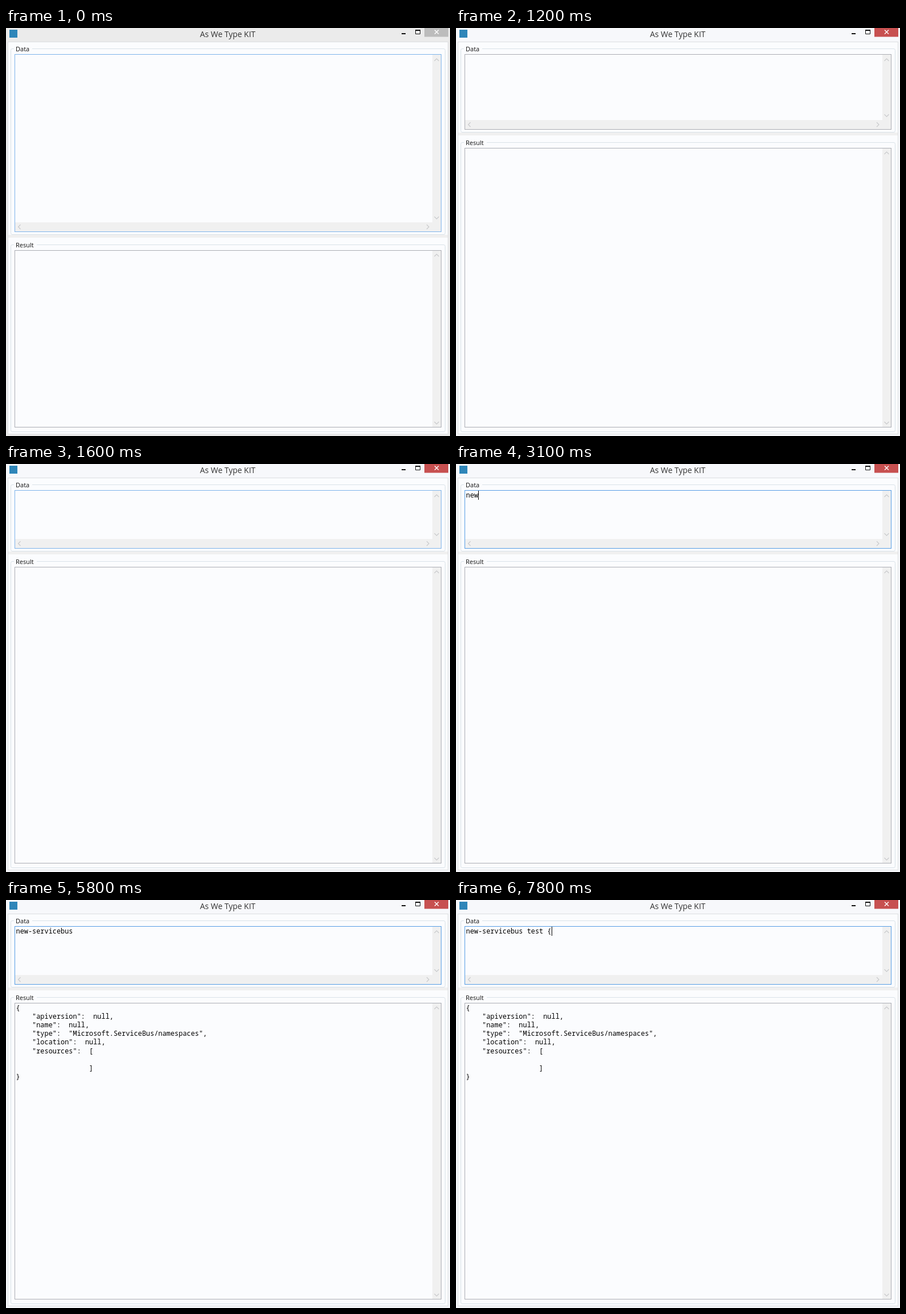
Animation of 780x718 px, one loop 8 s. Source, as an HTML page:

```html
<!DOCTYPE html>
<html lang="en">
<head>
<meta charset="utf-8">
<title>As We Type KIT</title>
<style>
  html, body { margin: 0; width: 100%; height: 100%; overflow: hidden; }
  svg { display: block; }
  path { fill: none; }
  .label { font: 11px "Open Sans", sans-serif; fill: #111; }
  .code { font: 11.91px "Noto Sans Mono", monospace; fill: #000; white-space: pre; }
  .group { stroke: #d9e2e8; }
  .box { fill: #fbfcfe; stroke: #abadb3; }
  .track { fill: #f0f0f0; }
  .chevron { stroke: #c8c9cb; stroke-width: 1.1; }
  #frame { fill: #ebebeb; }
  #close { fill: #bcbcbc; }
  .active #frame { fill: #f7f8fb; }
  .active #close { fill: #c75050; }
  .hover #dataBox { stroke: #7eb4ea; }
  .focus #dataBox { stroke: #569de5; }
</style>
</head>
<body>
<svg id="stage" width="780" height="718" viewBox="0 0 780 718">
  <rect id="frame" width="780" height="718"/>
  <rect x="3.5" y="24.5" width="773" height="690" fill="#fbfcfe" stroke="#dcdee0"/>

  <rect x="6" y="3" width="14" height="14" fill="#2f86b9"/>
  <text x="389.5" y="16" text-anchor="middle" font-family="Open Sans, sans-serif" font-size="13.9" fill="#333">As We Type KIT</text>
  <rect x="695" y="9" width="7" height="2" fill="#111"/>
  <path d="M719.5 4V10.5H727.5V4" stroke="#111"/>
  <rect x="719" y="3" width="9" height="2" fill="#111"/>
  <rect id="close" x="735" width="42" height="15.5"/>
  <path d="M753 3.5l7 7m0-7l-7 7" stroke="#fff" stroke-width="1.4"/>

  <path id="dataGroup" class="group"/>
  <text class="label" x="17" y="41">Data</text>
  <rect id="dataBox" class="box" x="15.5" y="46.5" width="749"/>
  <rect id="dataTrack" class="track" x="749" y="47" width="15"/>
  <path class="chevron" d="M752.5 58l4-4 4 4"/>
  <g id="dataFoot">
    <rect class="track" x="16" y="-16" width="748" height="16"/>
    <path class="chevron" d="M752.5-26l4 4 4-4M25.5-12l-4 4 4 4M739-12l4 4-4 4"/>
    <rect x="4" y="6" width="772" height="5" fill="#f0f0f0"/>
  </g>
  <text id="typed" class="code" x="17.5" y="59"></text>
  <rect id="caret" y="47" width="1" height="16"/>

  <path id="resultGroup" class="group"/>
  <text id="resultLabel" class="label" x="17">Result</text>
  <rect id="resultBox" class="box" x="15.5" width="749"/>
  <rect id="resultTrack" class="track" x="749" width="15"/>
  <path id="resultUp" class="chevron" d="M752.5 11l4-4 4 4"/>
  <path class="chevron" d="M752.5 693l4 4 4-4"/>
  <g id="output"></g>
</svg>
<script>
  const LOOP = 8000, ADVANCE = 7.146, LINE = 15.2;
  const command = 'new-servicebus test {';
  const keyTimes = [2800, 3000, 3100, 3500, 3700, 3800, 4000, 4300, 4500, 4600, 4800,
    5000, 5200, 5300, 6200, 6900, 7000, 7100, 7200, 7400, 7800];
  const caretGaps = [[0, 1800], [2300, 2800], [5800, 6200], [6800, 6900]];
  // [time, bottom edge of the data box] while the splitter is dragged
  const drag = [[0, 358], [1100, 270], [1200, 178], [1300, 161], [1400, 152], [1500, 148]];
  const json = `{
    "apiversion":  null,
    "name":  null,
    "type":  "Microsoft.ServiceBus/namespaces",
    "location":  null,
    "resources":  [

                  ]
}`;

  const $ = id => document.getElementById(id);
  const set = (id, attrs) => {
    for (const name in attrs) $(id).setAttribute(name, attrs[name]);
  };
  const within = (t, from, to) => t >= from && t < to;

  const groupPath = (top, bottom, gapEnd) =>
    `M14 ${top}H11Q8.5 ${top} 8.5 ${top + 3}V${bottom - 3}Q8.5 ${bottom} 11 ${bottom}` +
    `H769Q771.5 ${bottom} 771.5 ${bottom - 3}V${top + 3}Q771.5 ${top} 769 ${top}H${gapEnd}`;

  json.split('\n').forEach((line, i) => {
    const text = document.createElementNS('http://www.w3.org/2000/svg', 'text');
    text.setAttribute('class', 'code');
    text.setAttribute('x', 17.5);
    text.setAttribute('y', Math.round(193.6 + i * LINE));
    text.textContent = line;
    $('output').append(text);
  });

  function layout(bottom) {
    const top = bottom + 33;
    set('dataGroup', { d: groupPath(36.5, bottom + 5.5, 46) });
    set('dataBox', { height: bottom - 46 });
    set('dataTrack', { height: bottom - 47 });
    set('dataFoot', { transform: `translate(0 ${bottom})` });
    set('resultGroup', { d: groupPath(bottom + 23.5, 710.5, 54) });
    set('resultLabel', { y: top - 5 });
    set('resultBox', { y: top + .5, height: 702 - top });
    set('resultTrack', { y: top + 1, height: 701 - top });
    set('resultUp', { transform: `translate(0 ${top})` });
  }

  function render(t) {
    layout(drag.filter(([time]) => time <= t).pop()[1]);
    const { classList } = $('stage');
    classList.toggle('active', t >= 1000);
    classList.toggle('hover', t < 500 || within(t, 1600, 1800));
    classList.toggle('focus', t >= 1800);

    const count = keyTimes.filter(time => time <= t).length;
    const caretOn = !caretGaps.some(([from, to]) => within(t, from, to));
    $('typed').textContent = command.slice(0, count);
    set('caret', {
      x: Math.floor(18 + count * ADVANCE),
      visibility: caretOn ? 'visible' : 'hidden'
    });
    set('output', { visibility: t >= 5800 ? 'visible' : 'hidden' });
  }

  const start = performance.now();
  function tick() {
    render((performance.now() - start) % LOOP);
    requestAnimationFrame(tick);
  }
  tick();
</script>
</body>
</html>
```
